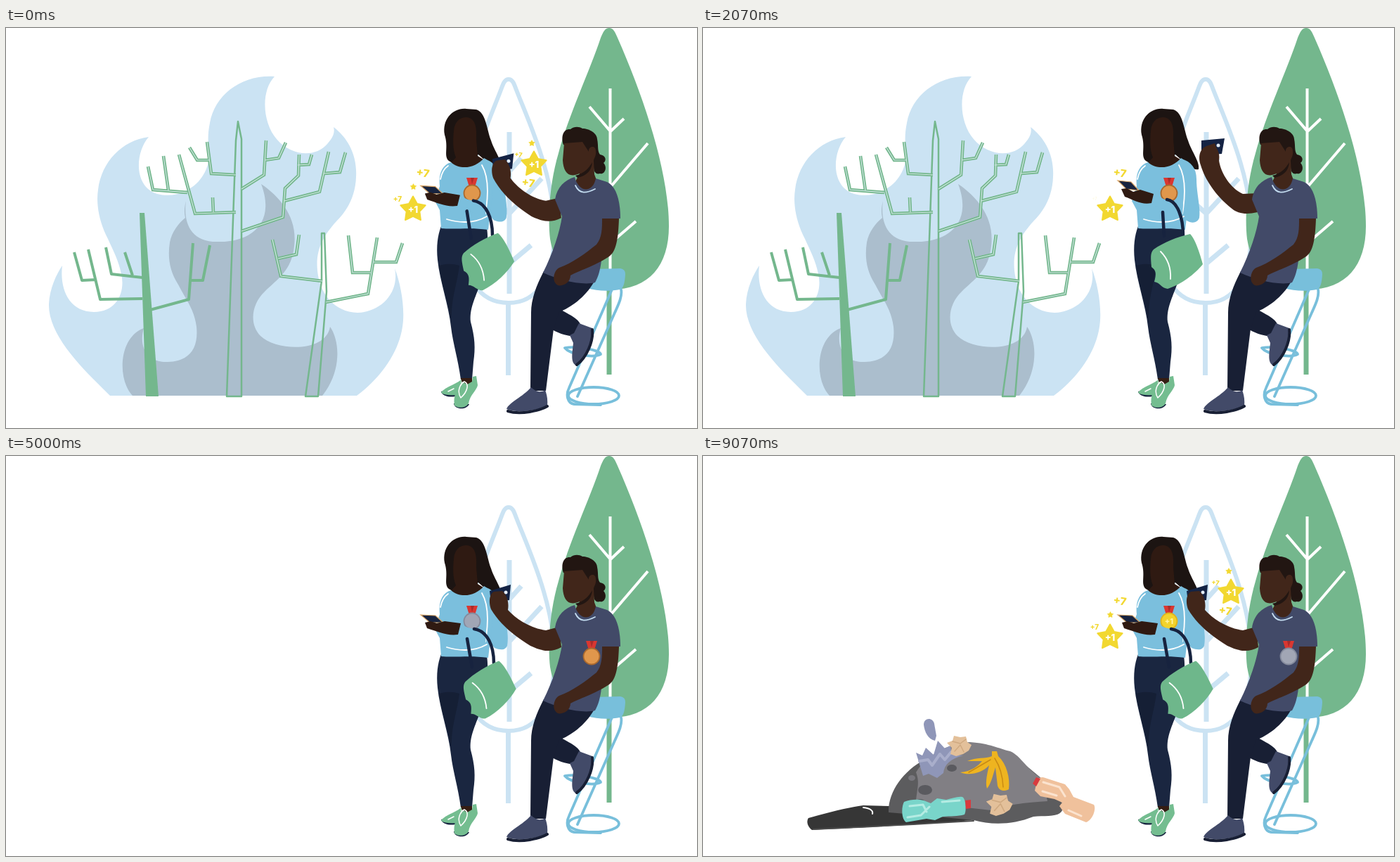
Write an HTML page that moves like this. It is 983 by 569 pixels and loops after 9390 ms.

```html
<!DOCTYPE html>
<html lang="en">
<head>
<meta charset="utf-8">
<title>Good deeds</title>
<style>
html, body { margin: 0; width: 100%; height: 100%; overflow: hidden; background: #fff; }
svg { display: block; width: 983px; height: 569px; }
.line { fill: none; stroke-linecap: round; stroke-linejoin: round; }
text { font: 800 12px Inter, Arial, sans-serif; text-anchor: middle; }
</style>
</head>
<body>
<svg viewBox="0 0 983 569">
  <!-- leaf trees -->
  <g class="line" stroke="#cbe3f3" stroke-width="6" style="stroke-linecap:butt">
    <path d="M715 73C709 73 707 80 704 88C690 126 652 205 650 290C650 355 672 391 715 391C755 391 781 355 780 285C780 210 743 132 726 88C723 80 721 73 715 73Z"/>
    <path stroke-width="7" d="M714.500 391V494M716 148V378M716 264L762 214M716 204L733 185M716 335L747 309M716 264L698 248"/>
  </g>
  <path d="M858 370V493" stroke="#74b78d" stroke-width="7"/>
  <path fill="#74b78d" d="M858 0C852 0 850 5 846 14C830 62 800 125 786 178C772 225 771 275 774 300C781 350 825 372 858 372C915 373 943 338 943 282C943 205 908 100 870 14C866 5 864 0 858 0Z"/>
  <path class="line" style="stroke-linecap:butt" stroke="#fff" stroke-width="4" d="M859.500 86V345M830 112L859 146M879 129L860 147M913 164L860 226M896 275L860 306"/>

  <!-- burning forest -->
  <g id="fire">
    <path fill="#cbe3f3" d="M148 523C115 490 60 440 61 393C62 370 72 350 80 338C76 372 90 404 125 404C158 404 170 375 164 350C160 330 153 318 145 300C132 275 128 250 131 230C136 190 165 160 203 155C183 178 182 226 215 236C250 245 288 220 289 180C287 160 287 150 290 135C297 95 335 66 382 69C362 90 365 135 385 158C405 182 440 185 457 165C466 155 468 148 466 141C485 155 500 180 498 212C497 240 485 260 470 275C452 295 440 315 443 345C446 378 467 404 500 405C535 404 560 375 553 342C562 365 568 400 564 425C558 465 530 500 499 523Z"/>
    <path fill="#abbecd" d="M180 523C158 500 160 440 196 427C188 455 202 476 230 475C262 474 274 455 271 425C268 400 255 385 245 365C232 345 230 325 233 305C236 290 245 278 255 270C253 262 254 254 256 246C252 276 262 304 300 304C345 306 385 280 363 222C390 240 415 270 410 310C407 345 385 358 368 375C350 392 345 420 362 438C385 460 455 462 461 425C475 445 478 488 450 523Z"/>
    <path fill="#74b78d" d="M190 263H197L217 524H199Z"/>
    <path class="line" style="stroke-linecap:butt" stroke="#74b78d" stroke-width="4" d="M194 385L134 386L117 315M128 358L108 359L97 319M194 355L150 350L142 312M180 352L169 319M205 401L260 386L266 306M263 359L280 359L290 309"/>
    <g class="line" stroke="#74b78d" stroke-width="2.500">
      <path d="M330 133L335 158V524H314L327 160ZM449 292H453L456 375L444 524H426L449 360Z"/>
      <path id="twigs" style="stroke-linecap:butt;stroke-linejoin:miter" stroke-width="4.600" d="M327 262L269 264L246 180M258 234L209 230L202 197M231 231L224 182M295 262L294 241M327 209L292 207L286 162M289 188L272 188L261 170M335 229L367 209L370 160M368 188L388 185L398 163M335 289L394 269L397 228L416 210L417 180M415 195L431 194L435 180M396 246L446 233L459 176M452 207L475 205L483 177M450 360L391 353L379 301M387 328L413 322L417 294M455 390L515 378L528 298M519 348L493 348L487 295M523 333L555 333L564 306"/>
    </g>
  </g>

  <!-- rubbish heap -->
  <g id="heap">
    <path fill="#363636" d="M150 515C175 508 205 500 228 497L265 498L392 516C380 521 200 530 155 532C148 527 147 519 150 515Z"/>
    <path class="line" stroke="#4b4b4b" stroke-width="2" d="M157 531C230 528 300 524 385 519"/>
    <path class="line" stroke="#fff" stroke-width="2" d="M228 500Q243 502 241 509"/>
    <path fill="#5c5c5e" d="M264 507C263 478 285 448 315 432L420 420L440 424L482 459L500 478C508 486 512 493 512 499C512 515 490 511 470 513C440 525 410 525 385 518L300 510Z"/>
    <path fill="#817f84" d="M303 450C318 425 350 408 380 407C408 409 420 416 437 420C452 426 462 448 484 460L490 491C450 494 440 495 410 504L303 492C304 475 309 465 303 450Z"/>
    <g fill="#5a5a5f"><ellipse cx="297" cy="458" rx="5" ry="4" fill="#77767c"/><ellipse cx="316" cy="475" rx="10" ry="7"/><ellipse cx="309" cy="493" rx="7" ry="5"/><ellipse cx="354" cy="444" rx="7" ry="5"/></g>
    <g fill="#8f96b8">
      <path d="M303 422L312 426L317 415L328 425L334 405L344 416L352 412L354 425L370 426C353 430 343 439 342 451L333 458L321 452L313 455Z"/>
      <path d="M314 382C314 372 327 371 329 381L332 398L330 405C320 403 315 392 314 382Z"/>
    </g>
    <path class="line" stroke="#a9aecb" stroke-width="4" d="M308 434L320 432L326 440L337 424L344 432L353 421"/>
    <g id="paper">
      <path fill="#e3c09a" d="M347 408L355 405L357 398L366 400L374 399L376 407L382 411L378 419L370 424L360 427L352 424L354 415Z"/>
      <path class="line" stroke="#cfa981" stroke-width="1.500" d="M355 406L366 409L374 403M358 420L366 411L371 421"/>
    </g>
    <use href="#paper" transform="translate(28 55) scale(1.080 1.070)"/>
    <path fill="#eeb420" d="M411 420L418 420L420 427C432 438 437 458 435 474C428 478 421 476 419 469L416 443C412 455 410 466 404 473C401 464 405 449 407 440C396 452 378 455 366 450C382 449 392 440 397 434L376 434C389 428 402 431 411 427Z"/>
    <path class="line" stroke="#c98b14" stroke-width="1.500" d="M415 430Q426 447 427 471M409 432Q392 442 378 450"/>
    <path fill="#79d5ca" d="M286 492C296 488 306 488 314 490L324 494L333 487L346 489C355 487 362 484 369 485C374 487 375 505 372 510C362 513 352 512 341 513L330 518L318 516L289 521C282 516 282 500 286 492Z"/>
    <path class="line" stroke="#b5ece3" stroke-width="3" d="M294 498L313 496L318 506M340 492L365 490M291 514L310 511L322 499"/>
    <path fill="#d93a3e" d="M373 490L381 489V501L374 502Z"/>
    <path fill="#f0c19c" d="M475 462C478 457 482 456 487 458L515 467L521 474L527 485L556 496C560 502 554 518 545 521L515 509L507 498L511 493L500 488L480 484L472 476Z"/>
    <path class="line" stroke="#fbe3cf" stroke-width="3" d="M484 464L507 471L515 484M483 477L503 483M520 504L538 512"/>
    <path fill="#d93a3e" d="M474 457L480 459L474 470L469 466Z"/>
  </g>

  <!-- woman -->
  <path fill="#1c1412" d="M655 115C636 113 620 130 624 152C630 170 622 182 630 189L640 195L672 180C690 196 698 203 705 201C707 190 695 176 690 160C684 145 683 120 669 116Z"/>
  <path fill="#2f1a12" d="M637 146C638 134 645 127 655 127C668 128 670 142 669 158L671 182L679 187C670 203 645 205 633 192L640 184C635 172 636 158 637 146Z"/>
  <path fill="#1a2640" d="M619 282L684 285C687 300 684 340 675 363C667 385 659 400 661 418C667 440 668 455 665 475L663 500H647C643 470 636 450 633 425C630 395 617 360 614 330C612 310 614 295 619 282Z"/>
  <path fill="#151f35" d="M616 338C628 334 640 336 645 338C641 368 632 388 634 420C630 392 620 368 616 338Z"/>
  <path fill="#351d13" d="M647 498H663V509L650 510Z"/>
  <path fill="#17233f" d="M619 517C621 526 638 526 644 522L647 514ZM637 534C638 543 655 544 659 535Z"/>
  <path fill="#74bd90" d="M648 500C640 507 623 511 619 519C625 523 636 523 644 521ZM649 503C640 513 636 526 638 537C645 542 655 540 658 534C660 522 670 515 671 508L669 495L664 496L663 503L656 507Z"/>
  <path class="line" stroke="#fff" stroke-width="1.500" d="M647 526C641 517 646 506 652 503C659 506 657 517 647 526M629 517L637 513"/>
  <path id="sleeve" fill="#7bbfdd"/>
  <path fill="#7bbfdd" d="M633 191C647 203 668 199 680 185C690 190 695 205 694 220L686 287C660 283 640 287 619 285L617 259L610 246L617 225C615 208 620 195 633 191Z"/>
  <path class="line" stroke="#fff" stroke-width="1.800" d="M618 215C620 205 623 200 629 196M677 195C684 207 688 228 682 264M627 272C643 277 665 279 684 268"/>
  <g id="herMedal" transform="translate(663 235)"></g>
  <path fill="#7bbfdd" d="M639 236L657 244L683 250L682 268C665 265 650 256 637 251Z"/>
  <path id="herPhone" fill="#17233f" stroke="#d9a566" stroke-width="1.200"/>
  <path id="herHand" fill="#2f1a12"/>
  <path id="strap" class="line" stroke="#17233f" stroke-width="4.500"/>
  <g id="bag">
    <path fill="#6eb78b" d="M641 315C655 305 675 297 693 293C701 301 708 325 711 336C700 350 680 365 661 371C652 370 650 362 642 361C645 350 645 345 638 340C637 327 636 320 641 315Z"/>
    <path class="line" stroke="#fff" stroke-width="1.800" d="M651 318C660 327 666 340 665 357"/>
  </g>

  <!-- man and stool -->
  <g class="line" stroke="#78bfdb" stroke-width="3.800">
    <path d="M862 372L801 512C796 522 799 534 808 535L846 536M875 372C877 382 871 394 866 405L813 524M795 455C812 452 845 458 846 464C835 470 802 464 795 455Z"/>
    <ellipse cx="836" cy="523" rx="36" ry="12"/>
  </g>
  <path fill="#78bfdb" d="M836 343L874 342Q881 343 881 350Q880 371 873 372C858 375 840 374 826 370Z"/>
  <path fill="#181f34" d="M785 398C800 408 815 412 818 424L808 439C795 437 784 434 774 427Z"/>
  <path fill="#181f34" d="M765 346C755 365 747 385 747 405L746 516H768L779 428L787 404C803 398 824 383 836 362Z"/>
  <path fill="#424a68" d="M815 420L834 427C836 440 828 465 812 480C802 478 806 460 807 448L802 437L808 434Z"/>
  <path fill="#424a68" d="M747 511C735 525 716 532 712 542C730 549 760 543 770 537C771 528 769 520 767 515C760 520 752 516 747 511Z"/>
  <path class="line" stroke="#181f34" stroke-width="4" d="M714 545C732 551 760 544 770 538M834 429C836 445 826 469 812 479"/>
  <path fill="#221612" d="M793 166C789 154 793 143 803 144C808 140 815 140 820 143C830 143 841 150 841 158C843 168 841 175 845 180C853 181 855 188 850 192C856 198 852 209 845 207C839 209 836 204 836 198L828 178Z"/>
  <path fill="#41261a" d="M794 164L820 162L829 176C828 168 839 166 839 175C840 182 836 186 836 189L837 208L842 222C835 235 818 234 809 220L816 207C800 214 793 205 792 188Z"/>
  <path fill="#221612" d="M810 210C822 207 829 200 834 191C833 204 825 210 813 213Z"/>
  <path id="phone" fill="#142344"/>
  <circle id="lens" r="2.500" fill="#e4edf7"/>
  <path id="arm" fill="#41261a"/>
  <path fill="#424a68" d="M809 212C795 216 784 226 781 244L791 268C788 290 778 320 764 348C785 358 820 367 838 362C848 345 848 320 849 300L848 271H874C874 245 868 225 855 219L839 214C835 235 815 235 809 212Z"/>
  <path class="line" stroke="#c3dcf0" stroke-width="1.800" d="M810 224C816 237 826 235 838 229"/>
  <g id="hisMedal" transform="translate(833 285)"></g>
  <path fill="#41261a" d="M848 271H872C871 300 868 318 858 325C835 340 815 345 803 352C803 362 792 368 785 366C775 360 780 344 787 341C805 335 825 320 840 308C848 298 848 285 848 271Z"/>

  <g id="rewards" fill="#f2d831"></g>
</svg>
<script>
const LOOP = 9390;
const $ = id => document.getElementById(id);
const clamp = v => Math.max(0, Math.min(1, v));
const ramp = (t, start, length) => clamp((t - start) / length);
const smooth = v => v * v * (3 - 2 * v);

// Shapes with a raised and a lowered pose; both share one command structure.
const poses = {
  arm: ['M790 235L789 262C775 265 765 265 755 259C731 241 714 216 708 195C704 185 706 172 716 168L728 164C730 172 736 176 734 188C736 205 750 228 768 236Z',
        'M787 243L790 272C776 280 763 278 746 270C720 254 702 238 690 218C686 207 688 196 694 193L706 192C712 197 716 207 714 219C725 231 745 245 768 248Z'],
  phone: ['M709 160L742 157L738 179L709 181Z', 'M688 192L718 183L716 205L690 208Z'],
  sleeve: ['M680 186C695 190 702 200 702 215C702 235 708 255 706 270C703 278 695 278 688 274L675 255Z',
           'M680 186C695 190 706 205 710 225C713 245 715 258 713 270C710 277 703 276 695 273L675 250Z'],
  strap: ['M656 296L654 262M660 244C675 246 683 270 683 295', 'M663 300L656 260M666 246C685 249 694 270 694 295'],
  herPhone: ['M590 217L609 219L620 231L602 229Z', 'M590 226L611 227L622 237L603 237Z'],
  herHand: ['M595 229L603 228L612 233L622 230L641 236L638 249C624 252 614 245 600 240Z',
            'M596 237L604 235L613 238L624 235L647 238L643 254C627 256 615 250 599 245Z']
};
const number = /\d+/g;
function mixPath([a, b], p) {
  const ends = b.match(number);
  let i = 0;
  return a.replace(number, n => (+n + (ends[i++] - n) * p).toFixed(2));
}

function starPath(r) {
  let d = '';
  for (let i = 0; i < 10; i++) {
    const a = i * Math.PI / 5 - Math.PI / 2, q = i % 2 ? r * .53 : r;
    d += (i ? 'L' : 'M') + (q * Math.cos(a)).toFixed(1) + ' ' + (q * Math.sin(a)).toFixed(1);
  }
  return d + 'Z';
}
const star = r => `<path d="${starPath(r)}" stroke="#f2d831" stroke-width="${r / 9}" stroke-linejoin="round"/>`;
const label = (s, size, tilt) => `<text y="${size * .36}" transform="rotate(${tilt})" style="font-size:${size}px">${s}</text>`;
const bigStar = star(18.5) + `<g fill="#fff">${label('+1', 13, 0)}</g>`;

// x, y, delay after the start of a reward round, content
const rewards = [
  [593, 206, 0, label('+7', 15, 8)],
  [579, 258, 130, bigStar],
  [557, 243, 260, label('+7', 10, 0)],
  [579.5, 226, 390, star(4.5)],
  [729, 180, 610, label('+7', 9, 8)],
  [751, 194, 740, bigStar],
  [743, 220, 870, label('+7', 15, 8)],
  [748, 164, 1000, star(4.5)]
].map(([x, y, delay, content]) => {
  const node = document.createElementNS('http://www.w3.org/2000/svg', 'g');
  node.innerHTML = content;
  $('rewards').append(node);
  return { x, y, delay, node };
});
const rounds = [[-3000, 250], [1800, 3300], [6950, LOOP]];

const medalArt = '<path fill="#d93731" d="M-8-22H8L4-9H-4Z"/><path fill="#a92c2b" d="M-2-22H3L0-13Z"/>' +
  '<circle r="11.500" stroke-width="1.800"/><g fill="#fff3a0" opacity="0">' + label('+1', 11, 0) + '</g>';
for (const id of ['herMedal', 'hisMedal']) $(id).innerHTML = medalArt;
const metals = [['#e0974c', '#a9692f'], ['#a1a6b5', '#858b9d'], ['#f3d32c', '#dfb51e']];
function setMedal(id, rank) {
  const medal = $(id), disc = medal.querySelector('circle');
  medal.setAttribute('opacity', rank < 0 ? 0 : 1);
  const [fill, rim] = metals[Math.max(0, rank)];
  disc.setAttribute('fill', fill);
  disc.setAttribute('stroke', rim);
  medal.lastChild.setAttribute('opacity', rank === 2 ? 1 : 0);
}

// A pale core turns the solid twigs into outlined ones.
const core = $('twigs').cloneNode();
core.removeAttribute('id');
core.setAttribute('stroke', '#cfe7e3');
core.setAttribute('stroke-width', 1.2);
$('twigs').after(core);

function draw(t) {
  $('fire').setAttribute('opacity', t < 1100 ? 1 - ramp(t, 300, 700) : ramp(t, 1190, 600) * (1 - ramp(t, 3440, 600)));
  $('heap').setAttribute('opacity', ramp(t, 5400, 600));

  const lowered = t < 2000 ? .82 * (1 - smooth(ramp(t, 0, 700))) : smooth(ramp(t, 4250, 700));
  for (const id in poses) $(id).setAttribute('d', mixPath(poses[id], lowered));
  $('lens').setAttribute('cx', 733 - 22 * lowered);
  $('lens').setAttribute('cy', 167 + 27 * lowered);
  $('bag').setAttribute('transform', `translate(${14.5 * lowered} ${lowered}) rotate(${-9 * lowered} 674 332)`);

  for (const { x, y, delay, node } of rewards) {
    const size = Math.max(...rounds.map(([from, to]) => ramp(t, from + delay, 100) * (1 - ramp(t, to, 100))));
    node.setAttribute('transform', `translate(${x} ${y}) scale(${.5 + size / 2})`);
    node.setAttribute('opacity', size);
  }
  setMedal('herMedal', t < 2360 ? 0 : t < 7510 ? 1 : 2);
  setMedal('hisMedal', t < 3050 ? -1 : t < 8200 ? 0 : 1);
}

function tick() {
  draw(performance.now() % LOOP);
  requestAnimationFrame(tick);
}
tick();
</script>
</body>
</html>
```
